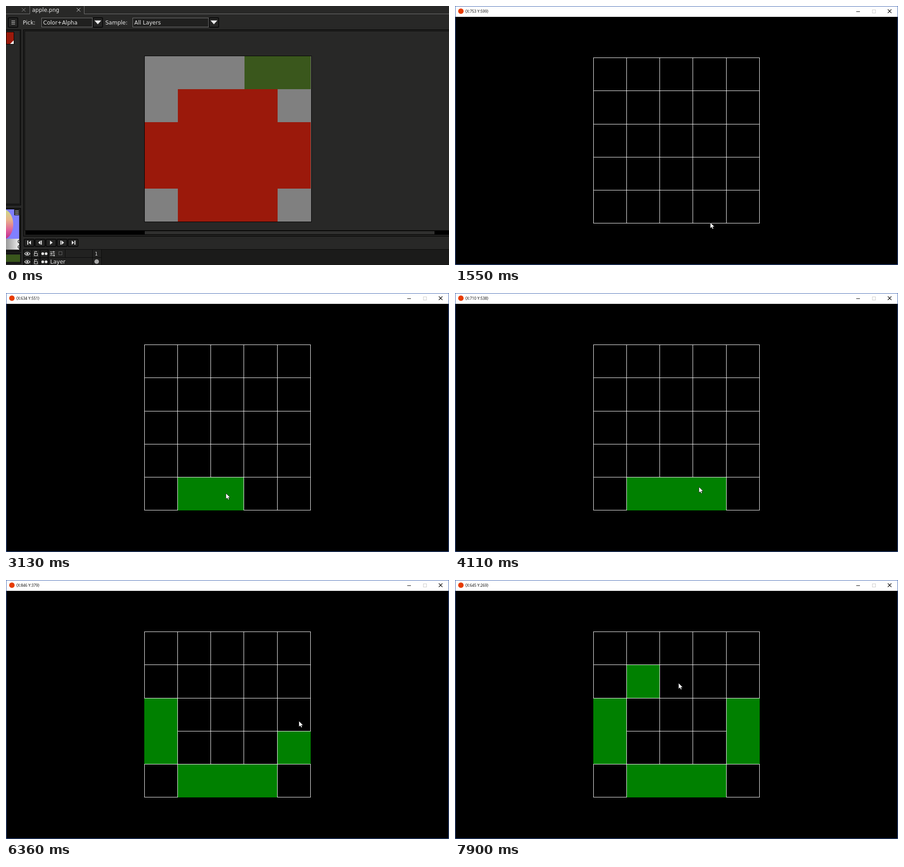
An HTML page for the animation above (8 s loop, 977x573 px).

```html
<!DOCTYPE html>
<html lang="en">
<head>
<meta charset="utf-8">
<title>Grid painting</title>
<style>
  html, body { margin: 0; width: 100%; height: 100%; overflow: hidden; background: #000; }
  svg { display: block; width: 977px; height: 573px; }
  .ui { font: 12px "DejaVu Sans", sans-serif; fill: #e6e6e6; }
  .title { font: 8.4px "Open Sans", sans-serif; fill: #000; }
  .crisp { shape-rendering: crispEdges; }
</style>
</head>
<body>
<svg viewBox="0 0 977 573">
  <defs>
    <linearGradient id="wheel" x1="0" y1="0" x2="0" y2="1">
      <stop offset="0" stop-color="#c9dc8c"/>
      <stop offset=".35" stop-color="#e8b48a"/>
      <stop offset=".7" stop-color="#e0609a"/>
      <stop offset="1" stop-color="#b92a8e"/>
    </linearGradient>
    <linearGradient id="alpha">
      <stop offset="0" stop-color="#999"/>
      <stop offset="1" stop-color="#eee"/>
    </linearGradient>
  </defs>
  <g id="editor"></g>
  <g id="window">
    <rect width="977" height="573" fill="#000"/>
    <rect width="977" height="24" fill="#fff"/>
    <circle cx="13" cy="11.5" r="6" fill="#e73c00"/>
    <text id="coords" class="title" x="22.5" y="15.2"></text>
    <path class="crisp" d="M885 12.5h8" stroke="#000"/>
    <rect class="crisp" x="920.5" y="8.5" width="7" height="7" fill="none" stroke="#ccc"/>
    <path d="M954.5 7.5l8 8m0-8l-8 8" stroke="#000" stroke-width="1.1"/>
    <g id="cells" class="crisp"></g>
    <rect class="crisp" x=".5" y=".5" width="976" height="572" fill="none" stroke="#3d63b0"/>
  </g>
  <path id="cursor" d="M0 0V13L3 10.3L5 14.6L7.2 13.6L5.3 9.4H9.4Z" fill="#fff" stroke="#000" stroke-width=".7"/>
</svg>
<script>
const LOOP = 8000, OPEN = 680, STEP = 30, SCALE = 0.7616;
const $ = id => document.getElementById(id);

// ---- pixel editor scene ----
const box = (x, y, w, h, fill, stroke = 'none') => {
  const o = stroke === 'none' ? 0 : 0.5;
  return `<rect class="crisp" x="${x + o}" y="${y + o}" width="${w - 2 * o}" height="${h - 2 * o}" fill="${fill}" stroke="${stroke}"/>`;
};
const label = (x, y, s) => `<text class="ui" x="${x}" y="${y}">${s}</text>`;
const icon = (d, fill = '#e6e6e6') => `<path d="${d}" fill="${fill}"/>`;
const line = (d, stroke = '#e6e6e6', w = 1.2) => `<path d="${d}" fill="none" stroke="${stroke}" stroke-width="${w}"/>`;
const button = (x, y, w, h) =>
  `<rect x="${x + 1}" y="${y + 1}" width="${w - 2}" height="${h - 2}" rx="2" fill="#252524" stroke="#0a0a0a" stroke-width="2"/>`;
const combo = (x, w, s) => box(x, 26, w, 21, '#20201f', '#777') + label(x + 4, 41, s) +
  button(x + w, 25, 23, 23) + icon(`M${x + w + 4} 32h15l-7.5 8.5z`);
const tabCross = (x, c) => line(`M${x - 4} 4.5l8 8m0-8l-8 8`, c, 1);

function eye(y) {
  return line(`M41 ${y}Q47 ${y - 7} 53 ${y}Q47 ${y + 7} 41 ${y}Z`) + `<circle cx="47" cy="${y}" r="2" fill="#e6e6e6"/>`;
}
function layerRow(y) {
  return [39, 57, 75].map(x => box(x, y - 9, 18, 18, '#222221', '#0a0a0a')).join('') + eye(y) +
    box(62, y - 1, 8, 6, 'none', '#e6e6e6') + line(`M63.5 ${y - 1}v-4h4v2`) +
    `<circle cx="81" cy="${y}" r="3" fill="#e6e6e6"/><circle cx="88.5" cy="${y}" r="3" fill="#e6e6e6"/>`;
}
function apple() {
  const red = '#9b190b', green = '#3a571c';
  return box(305, 110, 369, 368, '#808080', '#000') + box(526, 111, 146, 73, green) +
    box(379, 184, 220, 293, red) + box(306, 257, 366, 147, red);
}
function player() {
  const glyphs = [
    'M47 519h2v9h-2zM55 519v9l-5-4.5z', 'M76 519v9l-5-4.5zM77 519h2v9h-2z', 'M97 519v9l6-4.5z',
    'M120 519h2v9h-2zM123 519v9l5-4.5z', 'M145 519v9l5-4.5zM151 519h2v9h-2z'];
  return glyphs.map((d, i) => button(39 + i * 24.2, 515, 24, 18) + icon(d)).join('');
}
$('editor').innerHTML =
  box(0, 0, 977, 573, '#282827') +
  line('M0 17.5H52.5V0M172.5 0V17.5H977', '#777', 1) +
  tabCross(39, '#999') + tabCross(160, '#e6e6e6') + label(57.5, 13, 'apple.png') +
  button(4, 25, 23, 23) + line('M12 33h8m-8 3.5h8m-8 3.5h8') +
  label(37, 41, 'Pick:') + combo(78, 113, 'Color+Alpha') +
  label(219, 41, 'Sample:') + combo(279, 168, 'All Layers') +
  // left panels
  box(-5, 52, 38, 389, '#1f1f1e', '#000') + box(-5, 54, 36, 384, '#282827', '#111') +
  box(0, 57, 18, 28, '#9b190b', '#000') + icon('M17 76v8h-8z', '#fff') +
  box(-5, 447, 38, 97, '#1a1a19', '#000') + box(0, 450, 29, 65, '#8080ff') +
  '<ellipse cx="-6" cy="483" rx="22" ry="33" fill="url(#wheel)"/>' +
  box(18, 450, 12, 13, '#222') + line('M20 453.5h8m-8 3.5h8m-8 3.5h8') +
  box(0, 515, 29, 24, 'url(#alpha)') + line('M29 518a2.5 3 0 0 0 0 6M29 530a2.5 3 0 0 0 0 6', '#000') +
  box(-5, 546, 38, 24, '#1a1a19', '#000') + box(0, 550, 31, 16, '#3a571c') +
  // canvas
  box(38, 52, 945, 458, '#20201f', '#000') + box(41, 55, 945, 442, '#282827', '#0c0c0c') + apple() +
  box(43, 497, 940, 9, '#000') + box(306, 498, 639, 7, '#30302f') +
  // timeline
  player() + box(38, 538, 945, 40, '#1b1b1a', '#0a0a0a') +
  box(39, 539, 171, 34, '#222221') + layerRow(548) + layerRow(566) +
  line('M97 544h11m-11 4h11m-11 4h11M105 542v4M100 546v4M106 550v4') + box(116, 543, 8, 8, 'none', '#666') +
  line('M39 556.5H210M93.5 539V573M130.5 539V556M190.5 539V573M210.5 539V573', '#0a0a0a', 1) +
  label(196, 552, '<tspan font-size="10">1</tspan>') + label(97.5, 570, 'Layer') +
  '<circle cx="200" cy="565.5" r="5" fill="#aaa"/>';

// ---- paint grid scene ----
const lineX = i => Math.round(305 + 73.15 * i);
const lineY = i => Math.round(114.3 + 73.15 * i);
// time, column, row
const clicks = [[2640, 1, 4], [3130, 2, 4], [3690, 3, 4], [4260, 0, 3], [5040, 0, 2],
  [5710, 4, 3], [6420, 4, 2], [7530, 1, 1]];

function drawCells(t) {
  let fills = '', outlines = '';
  for (let r = 0; r < 5; r++) for (let c = 0; c < 5; c++) {
    const x = lineX(c), y = lineY(r), w = lineX(c + 1) - x + 1, h = lineY(r + 1) - y + 1;
    const on = clicks.some(k => k[1] === c && k[2] === r && t >= k[0]);
    if (on) fills += box(x, y, w, h, '#008000');
    else outlines += box(x, y, w, h, 'none', '#fff');
  }
  return fills + outlines;
}

// ---- mouse path: time, X, Y in game units, easing towards the point ----
const ease = {
  linear: p => p,
  in: p => p * p,
  out: p => p * (2 - p),
  both: p => p * p * (3 - 2 * p)
};
const path = [
  [680, 1190, 733], [1520, 753, 599, 'linear'], [1550, 737, 598, 'linear'], [1940, 549, 554, 'out'],
  [2830, 549, 554], [3085, 634, 551, 'both'],
  [3290, 634, 551], [3630, 730, 556, 'both'], [3840, 730, 556], [4110, 702, 531, 'in'], [4235, 463, 483, 'out'],
  [4390, 463, 483], [4960, 466, 379, 'both'],
  [5170, 466, 379], [5560, 868, 423, 'both'], [5680, 848, 445, 'both'], [5850, 848, 445],
  [6000, 848, 405, 'in'], [6320, 846, 379, 'out'],
  [6680, 846, 379], [6800, 820, 434, 'both'],
  [6990, 820, 434], [7495, 555, 281, 'both'],
  [7660, 555, 281], [7870, 645, 269, 'both']
];
const starts = [680, 2860, 3320, 4140, 4420, 5200, 6030, 6710, 7020, 7690];

function mouse(t) {
  const i = path.findIndex(k => k[0] > t);
  if (i === 0) return path[0].slice(1, 3);
  if (i < 0) return path[path.length - 1].slice(1, 3);
  const a = path[i - 1], b = path[i], p = ease[b[3] || 'linear']((t - a[0]) / (b[0] - a[0]));
  return [1, 2].map(n => Math.round(a[n] + (b[n] - a[n]) * p));
}
function snap(t) {
  const s = starts.filter(v => v <= t).pop();
  return s + Math.floor((t - s) / STEP) * STEP;
}

let painted = -1;
function render(t) {
  const playing = t >= OPEN;
  $('editor').style.display = playing ? 'none' : '';
  $('window').style.display = playing ? '' : 'none';
  let x = t < 260 ? 941 : 896, y = t < 160 ? 600 : 572;
  if (playing) {
    const now = snap(t), [mx, my] = mouse(now), [lagX, lagY] = mouse(now - STEP);
    x = Math.round(mx * SCALE + 2.1);
    y = Math.round(my * SCALE + 23.3);
    $('coords').textContent = `{X:${lagX} Y:${lagY}}`;
    const count = clicks.filter(k => k[0] <= t).length;
    if (count !== painted) {
      $('cells').innerHTML = drawCells(t);
      painted = count;
    }
  }
  $('cursor').setAttribute('transform', `translate(${x} ${y})`);
}

const begin = performance.now();
function tick() {
  render((performance.now() - begin) % LOOP);
  requestAnimationFrame(tick);
}
tick();
</script>
</body>
</html>
```
